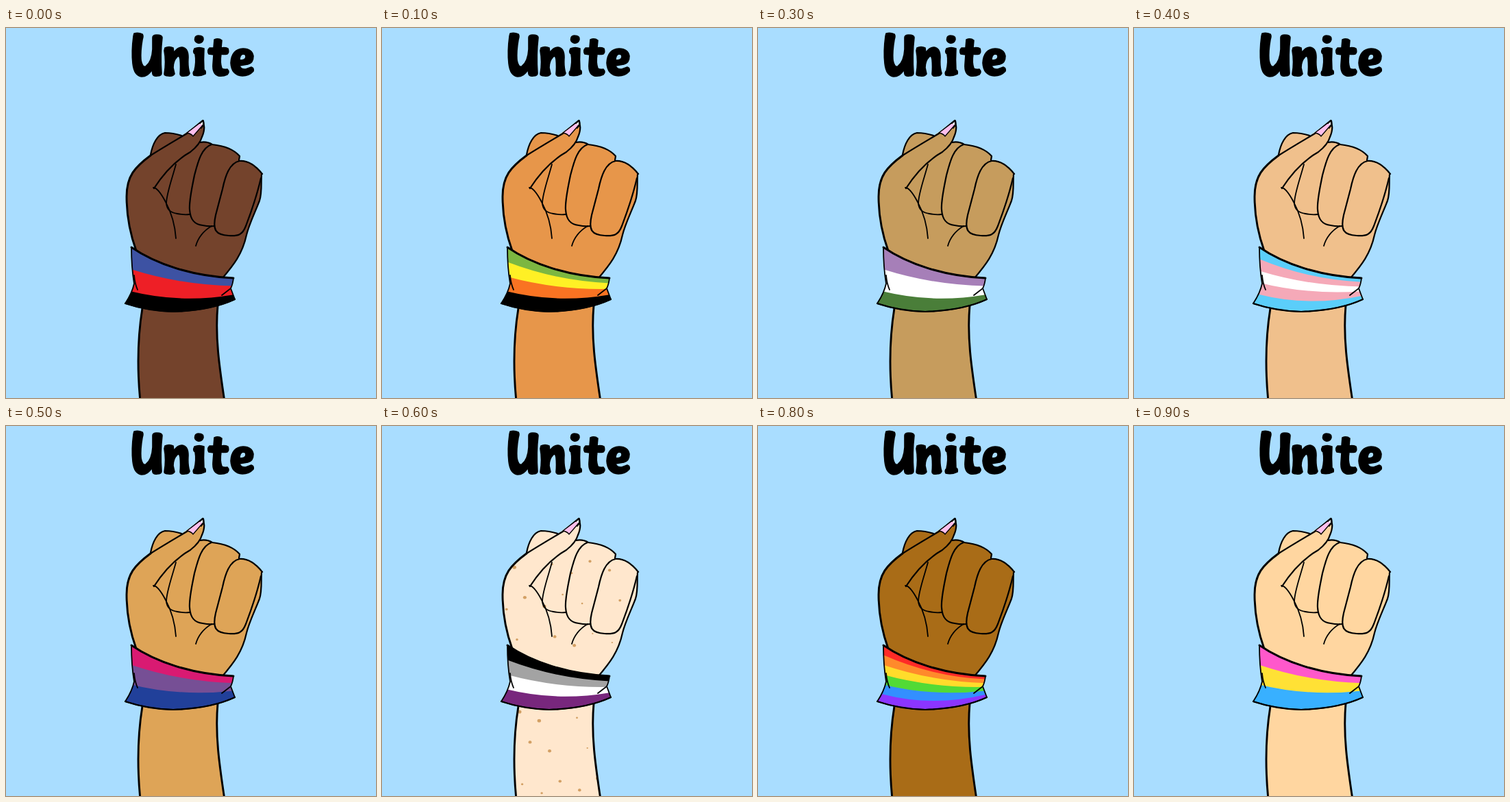
An HTML page for the animation above (1 s loop, 540 by 540 pixels).

```html
<!DOCTYPE html>
<html lang="en">
<head>
<meta charset="utf-8">
<title>Unite</title>
<style>
  html, body { margin: 0; width: 100%; height: 100%; overflow: hidden; background: #a9ddff; }
  svg { display: block; width: 100vw; height: 100vh; }
  .ink { fill: none; stroke: #000; stroke-width: 2.2; stroke-linecap: round; stroke-linejoin: round; }
  .thick { stroke-width: 2.9; }
  .thin { stroke-width: 1.8; }
  #word { stroke: #000; stroke-width: 1.6; stroke-linejoin: round; }
</style>
</head>
<body>
<svg viewBox="0 0 540 540">
  <defs>
    <path id="arm" d="M199 400C194 438 190 485 196 545H319C310 492 304 450 309 400Z"/>
    <path id="fist" d="M190 325C181 300 176 275 176 246C176 216 188 203 211 186C214 169 221 155 232 153Q244 153 257 157L288 135Q292 150 286 160L283 167Q293 165 301 170Q329 173 341 188V194Q357 193 374 213C372 225 374 240 370 252C364 268 355 286 351 302C345 330 332 346 316 365Q240 365 190 325Z"/>
    <path id="band" d="M183 320C218 344 270 362 332 365Q331 374 328 380L334 396C306 409 276 413 244 414Q207 413 174 402Q184 387 187 373Q183 349 183 320Z"/>
    <clipPath id="skinClip"><use href="#arm"/><use href="#fist"/></clipPath>
    <clipPath id="bandClip"><use href="#band"/></clipPath>
  </defs>
  <rect width="540" height="540" fill="#a9ddff"/>

  <!-- lettering, with the plain word kept as text -->
  <text x="185" y="70" font-family="Lato, sans-serif" font-size="64" fill="none">Unite</text>
  <g id="word">
    <path d="M187 8Q193 6 199 9Q201 11 199 17Q196 34 197 47Q199 58 204 56Q213 49 214 31V14Q214 10 220 10Q228 10 228 14Q225 39 227 66Q227 70 221 70Q215 71 214 67L213 61Q207 71 198 71Q187 70 185 52Q183 34 186 12Z"/>
    <path d="M232 29Q238 26 244 29L245 36Q250 28 257 28Q266 29 266 43Q265 57 268 66Q267 70 261 70Q254 71 254 67Q255 56 254 46Q253 39 250 42Q244 48 244 58L246 67Q244 71 237 70Q231 70 231 67Q234 49 231 33Z"/>
    <path d="M275 30Q282 27 289 30Q288 46 289 61Q292 62 291 67Q283 71 274 69Q272 65 275 62Q278 49 276 38Q272 36 275 30ZM281 11Q289 11 288 17Q286 23 280 22Q274 20 276 14Q277 11 281 11Z"/>
    <path d="M304 17Q310 14 315 18L314 29Q320 28 324 30Q326 35 323 38Q318 39 314 38Q312 51 315 59Q318 61 323 60Q327 64 323 68Q317 71 310 70Q301 67 302 53L303 39L296 38Q293 33 297 29L303 29Z"/>
    <path fill-rule="evenodd" d="M346 30Q359 30 361 41Q361 51 353 53L341 55Q343 61 350 60L358 57Q362 58 361 63Q355 70 345 70Q329 69 328 51Q329 31 346 30ZM341 47Q350 47 350 42Q350 38 346 38Q341 39 341 47Z"/>
  </g>

  <g id="skin"><use href="#arm"/><use href="#fist"/></g>
  <g id="spots" fill="#d3a064" clip-path="url(#skinClip)"></g>

  <!-- arm, outer hand, fingers, creases -->
  <path class="ink thick" d="M199 409C194 440 190 485 196 545M309 405C305 450 311 492 319 545"/>
  <path class="ink thick" d="M190 325C181 300 176 275 176 246C176 216 188 203 211 186"/>
  <path class="ink" d="M211 186Q230 174 264 154L287 135Q292 145 286 159Q283 170 269 181Q239 198 216 234"/>
  <path class="ink" d="M211 185C214 169 221 155 232 153Q244 153 256 157"/>
  <path class="ink" d="M373 214C372 225 374 240 370 252C364 268 355 286 351 302C345 330 332 346 316 365"/>
  <path class="ink" d="M283 167Q293 165 301 170Q329 173 341 187L340 193"/>
  <path class="ink" d="M300 170C285 175 280 196 275 215C271 235 267 252 268 265C269 282 277 287 287 288Q296 290 304 289"/>
  <path class="ink thin" d="M248 199C243 218 234 242 234 256Q235 269 250 271Q260 273 268 272"/>
  <path class="ink" d="M374 213Q358 193 341 194C326 197 320 216 316 235L306 273C301 295 306 302 325 303C339 304 345 302 350 289C356 273 365 250 372 219"/>
  <path class="ink thin" d="M215 233Q222 233 233 254Q246 278 248 307M300 289Q282 300 277 318"/>

  <path d="M264 153L285 137L288 138L286 143L273 158Q270 154 264 153Z" stroke="#000" stroke-width="1.3" stroke-linejoin="round" fill="#ffbfec"/>
  <path d="M283 139L287 136L287 142Z" fill="#fff"/>
  <path class="ink thin" d="M283 139L288 135Q290 140 285 146"/>

  <g id="stripes" clip-path="url(#bandClip)"></g>
  <use href="#band" class="ink thin"/>
  <path class="ink thick" d="M183 320C218 344 270 362 332 365"/>
  <path class="ink" d="M174 402Q207 413 244 414C276 413 306 409 334 396"/>
  <path class="ink thin" d="M187 361Q188 373 192 382M315 390L328 380"/>
</svg>
<script>
  const STEP = 100;

  // stripe colours run from the top; stretch widens the upper stripes
  const looks = [
    { skin: "#74432c", stripes: "#3d52a3 #ee1f26 #000", stretch: 1.18 },
    { skin: "#e7964a", stripes: "#7cb741 #fff025 #f97322 #000" },
    { skin: "#8d5a34", stripes: "#fff433 #fff #9b59d0 #000" },
    { skin: "#c69c5d", stripes: "#a67fb8 #fff #4a7e39", stretch: 1.18 },
    { skin: "#f0c08c", stripes: "#5bcefa #f5a9b8 #fff #f5a9b8 #5bcefa" },
    { skin: "#dea457", stripes: "#d91a72 #764f95 #21409a" },
    { skin: "#ffe7cd", stripes: "#000 #a3a3a3 #fff #78277d", freckled: true },
    { skin: "#c98449", stripes: "#d52d00 #ff9a56 #fff #d362a4 #a30262" },
    { skin: "#a96c17", stripes: "#ff2b27 #ff8a2b #ffdc2b #52da36 #338fff #8b35ff" },
    { skin: "#ffd6a0", stripes: "#ff58cb #ffe135 #38b0ff" }
  ];

  const byId = id => document.getElementById(id);
  const skin = byId("skin"), spots = byId("spots"), stripes = byId("stripes");

  // evenly scattered freckles of mixed size
  function freckles(count) {
    const spread = (i, ratio) => (i * ratio) % 1;
    let out = "";
    for (let i = 1; i <= count; i++) {
      const x = 178 + 194 * spread(i, 0.7549);
      const y = 162 + 378 * spread(i, 0.5698);
      const r = 1 + 1.7 * spread(i, 0.618);
      out += `<ellipse cx="${x}" cy="${y}" rx="${r * 1.1}" ry="${r}"/>`;
    }
    return out;
  }

  // the part of the band below fraction t of its height
  function below(t) {
    const left = 320 + 82 * t, right = 364 + 32 * t;
    const bend = 362 + 15 * t + 46 * t * t;
    return `M165 ${left - 6}L183 ${left}Q255 ${bend} 332 ${right}H345V425H165Z`;
  }

  function show(look) {
    const colours = look.stripes.split(" ");
    const height = (look.stretch || 1.05) / colours.length;
    skin.setAttribute("fill", look.skin);
    spots.style.display = look.freckled ? "" : "none";
    stripes.innerHTML = `<rect x="165" y="310" width="180" height="115" fill="${colours[0]}"/>` +
      colours.slice(1).map((c, k) => `<path fill="${c}" d="${below((k + 1) * height)}"/>`).join("");
  }

  let shown;
  function update() {
    const look = looks[Math.floor(performance.now() / STEP) % looks.length];
    if (look !== shown) show(shown = look);
    requestAnimationFrame(update);
  }

  spots.innerHTML = freckles(42);
  update();
</script>
</body>
</html>
```
